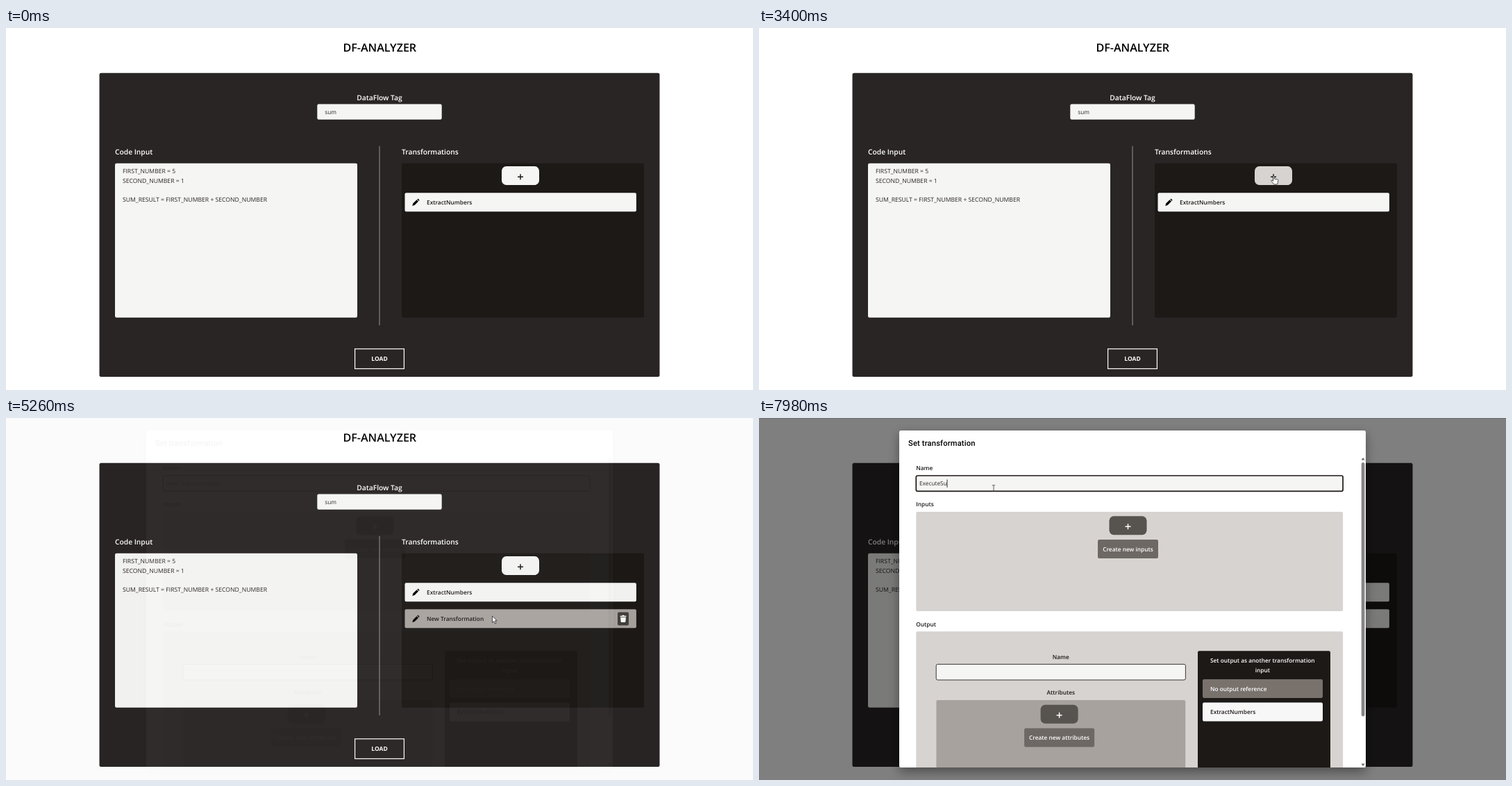
An HTML page that plays this animation: 1076x521 px, repeating every 8 s.

```html
<!DOCTYPE html>
<html lang="en">
<head>
<meta charset="utf-8">
<title>DF-ANALYZER</title>
<style>
  html, body { margin: 0; width: 100%; height: 100%; overflow: hidden; background: #fff; }
  svg { display: block; width: 100%; height: 100%; }
  text { font-family: "Open Sans", "Noto Sans", sans-serif; font-size: 8.3px; text-rendering: geometricPrecision; white-space: pre; }
  .b { font-weight: 600; }
  .mid { text-anchor: middle; }
  .w { fill: #fff; }
  .k { fill: #1c1917; }
  .label { font-size: 10.25px; font-weight: 600; fill: #fff; }
  .code { font-size: 8.65px; fill: #292524; }
  .title { font: 500 11.2px Roboto, sans-serif; letter-spacing: .0125em; }
</style>
</head>
<body>
<svg viewBox="0 0 1076 521" preserveAspectRatio="none">
  <defs>
    <path id="pencil" d="M0 10 .9 6.7 6.3 1.3 8.7 3.7 3.3 9.1ZM7 .6 7.5.1Q8.1-.4 8.7.1L9.9 1.3Q10.4 1.9 9.9 2.5L9.4 3Z"/>
    <g id="bin">
      <rect x="881" y="-9.5" width="16" height="19" rx="2" fill="#44403c"/>
      <path d="M884.5-4.2h2.8l.6-.9h2.2l.6.9h2.8v1.3h-9ZM885.1-2.2h7.8l-.5 6.2q-.1 1-1.1 1h-4.6q-1 0-1.1-1Z" fill="#fff"/>
    </g>
    <path id="plus" d="M-4 0H4M0-4V4" fill="none" stroke-width="1.5"/>
    <clipPath id="dialogClip"><rect x="202" y="18" width="672" height="485" rx="2.5"/></clipPath>
    <filter id="shadow" x="-10%" y="-10%" width="120%" height="125%">
      <feDropShadow dx="0" dy="6" stdDeviation="8" flood-color="#000" flood-opacity=".4"/>
    </filter>
  </defs>

  <g id="page">
    <rect width="1076" height="521" fill="#fff"/>
    <text class="b mid" x="538.3" y="33.8" style="font-size:16.1px">DF-ANALYZER</text>
    <rect x="134.5" y="64.7" width="807" height="437.3" rx="2.5" fill="#292524"/>
    <text class="label mid" x="538" y="103.6">DataFlow Tag</text>
    <rect x="448.3" y="109.5" width="179.4" height="22.3" rx="2.2" fill="#f5f5f4"/>
    <text x="459.3" y="124" fill="#292524">sum</text>
    <path d="M538 170V428" stroke="#a8a29e" stroke-width=".9"/>

    <text class="label" x="157" y="182">Code Input</text>
    <rect x="157" y="194.7" width="349" height="222" rx="2.2" fill="#f5f5f4"/>
    <text class="code" x="168" y="209">FIRST_NUMBER = 5</text>
    <text class="code" x="168" y="222.5">SECOND_NUMBER = 1</text>
    <text class="code" x="168" y="249.5">SUM_RESULT = FIRST_NUMBER + SECOND_NUMBER</text>

    <text class="label" x="570" y="182">Transformations</text>
    <rect x="570" y="194.7" width="349" height="222" rx="2.2" fill="#1c1917"/>
    <rect id="add" x="714" y="199" width="54" height="27" rx="6.7"/>
    <use href="#plus" x="741" y="214.3" stroke="#1c1917"/>
    <g id="rows"></g>

    <rect id="fill" x="502.6" y="461.8" height="28.6" fill="#e7e5e4"/>
    <rect x="502.6" y="461.8" width="70.8" height="28.6" fill="none" stroke="#fff" stroke-width="1.2"/>
    <text id="load" class="b mid" x="538" y="479.4" style="font-size:8.5px;font-weight:700">LOAD</text>
  </g>

  <g id="modal">
    <rect width="1076" height="521" opacity=".5"/>
    <path d="M0 .5H1076" stroke="#6e6e6e"/>
    <rect x="202" y="18" width="672" height="485" rx="2.5" fill="#fff" filter="url(#shadow)"/>
    <g clip-path="url(#dialogClip)">
      <text class="title" x="215" y="39.8">Set transformation</text>
      <text class="b k" x="226.3" y="75.3">Name</text>
      <rect id="field" x="226.3" y="83" width="614.8" height="22.4" rx="2.2" fill="#f5f5f4" stroke="#1c1917"/>
      <rect id="mark" x="231" y="88" height="12.3" fill="#0078d7"/>
      <text id="typed" x="231" y="97.4"></text>
      <path id="caret" d="M0 88.5V100" stroke="#000" stroke-width=".8"/>

      <text class="b k" x="226.3" y="127">Inputs</text>
      <rect x="226.3" y="135" width="614.8" height="143" rx="2" fill="#d6d3d1"/>
      <g id="inputTools"></g>

      <text class="b k" x="226.3" y="299.5">Output</text>
      <rect x="226.3" y="307.3" width="614.8" height="220" rx="2" fill="#d6d3d1"/>
      <text class="b k mid" x="434.8" y="346.5">Name</text>
      <rect x="255.2" y="354.4" width="359.2" height="22.6" rx="2.2" fill="#f5f5f4" stroke="#292524" stroke-width=".9"/>
      <text class="b k mid" x="434.8" y="398">Attributes</text>
      <rect x="255.4" y="406" width="358.8" height="120" rx="2" fill="#a8a29e"/>
      <g id="attrTools"></g>

      <rect x="632" y="335.3" width="191" height="190" rx="2.2" fill="#1c1917"/>
      <text class="b w mid" x="725.3" y="352.2">Set output as another transformation</text>
      <text class="b w mid" x="725.3" y="365.7">input</text>
      <rect x="639" y="376" width="173" height="27" rx="2.2" fill="#78716c"/>
      <text class="b w" x="650" y="392.5">No output reference</text>
      <rect x="639" y="409.5" width="173" height="27" rx="2.2" fill="#f8f7f7"/>
      <text class="b k" x="650" y="426">ExtractNumbers</text>

      <rect x="867.7" y="64" width="4.8" height="365.5" rx="2.4" fill="#858585"/>
      <path d="M867.6 60.5h5l-2.5-3.6ZM867.6 497.5h5l-2.5 3.6Z" fill="#666"/>
    </g>
  </g>

  <g id="cursor">
    <path id="arrow" d="M0 0V9.4L2.2 7.4 3.8 11 5.4 10.3 3.9 6.8H6.7Z" fill="#fff" stroke="#111" stroke-width=".7"/>
    <path id="hand" d="M-.2 0Q.8-1 1.5.3V4.2L6 5Q7 5.4 6.8 6.7L6.2 10 5.4 12H.9L-3 7.4Q-3.3 6 -1.9 6.2L-.4 7.3Z" fill="#fff" stroke="#111" stroke-width=".7"/>
    <path id="beam" d="M-2.2-4.2H-.5L0-3.8.5-4.2H2.2M0-3.8V4M-2.2 4.4H-.5L0 4 .5 4.4H2.2" fill="none" stroke="#333" stroke-width=".8"/>
  </g>
</svg>

<script>
const LOOP = 8000, STEP = 70.25, START = 200;
const el = Object.fromEntries([...document.querySelectorAll("[id]")].map(n => [n.id, n]));
const set = (node, attrs) => { for (const k in attrs) node.setAttribute(k, attrs[k]); };
const show = (node, on) => set(node, { visibility: on ? "visible" : "hidden" });
const clamp = v => Math.max(0, Math.min(1, v));
const ease = v => v * v * (3 - 2 * v);
const mix = (a, b, p) => `rgb(${a.map((v, i) => Math.round(v + (b[i] - v) * p))})`;

const PALE = [245, 245, 244], GREY = [168, 162, 158], SOFT = [214, 211, 209], DARK = [28, 25, 23], WHITE = [255, 255, 255];

// Pointer path: time, x, y
const PATH = [
  [200, 1031, 512], [450, 830, 400], [700, 700, 330], [960, 648, 309],
  [1250, 618, 299], [1500, 600, 318], [1780, 606, 344], [2100, 545, 455],
  [2180, 537, 478], [2330, 546, 489], [2450, 590, 466], [2600, 707, 375],
  [2670, 736, 349], [2800, 745, 290], [3000, 742, 245], [3150, 741, 213],
  [3500, 741, 213], [3640, 748, 222], [3760, 758, 260], [3860, 766.5, 282.5],
  [4350, 766.5, 282.5], [4735, 714, 277], [4766, 708, 262], [4900, 703, 250],
  [5000, 702, 256], [5120, 700.5, 285], [5560, 700.5, 285], [5900, 560, 215],
  [6200, 380, 115], [6370, 338, 101]
];

// Hover spans: from, to
const HOVER = {
  load: [[2110, 2400]],
  add: [[3130, 3660]],
  first: [[2960, 3110], [3680, 3790], [4790, 5030]],
  second: [[3790, 4745], [5050, 5290]]
};
const ADDED = 3430, OPENED = 5190, FOCUSED = 6290, SELECTED = 6440;

const OLD_NAME = "New Transformation", NEW_NAME = "ExecuteSu";
const KEYS = [6840, 7040, 7180, 7370, 7430, 7500, 7710, 7910, 7980];
const FADE = [0, .03, .5, .94, 1];

function row(y, name) {
  el.rows.insertAdjacentHTML("beforeend", `<g>
    <rect x="574.5" y="${y}" width="333.4" height="27" rx="2"/>
    <use href="#pencil" x="585.3" y="${y + 8.7}"/>
    <text class="b k" x="606" y="${y + 16.8}">${name}</text>
    <use href="#bin" y="${y + 13.6}"/></g>`);
  const g = el.rows.lastElementChild;
  return { g, box: g.firstElementChild, bin: g.lastElementChild };
}

function tools(parent, cx, y, label, width) {
  parent.innerHTML = `<rect x="${cx - 27}" y="${y}" width="54" height="27" rx="6.7" fill="#57534e"/>
    <use href="#plus" x="${cx}" y="${y + 15}" stroke="#fff"/>
    <rect x="${cx - width / 2}" y="${y + 33.7}" width="${width}" height="27" rx="2.2" fill="#6e6864"/>
    <text class="b w mid" x="${cx}" y="${y + 50.3}">${label}</text>`;
}

const first = row(237.2, "ExtractNumbers");
const second = row(275.3, OLD_NAME);
tools(el.inputTools, 531.5, 141.2, "Create new inputs", 87);
tools(el.attrTools, 432.6, 412.8, "Create new attributes", 101);

const inside = (t, spans) => spans.some(([a, b]) => t >= a && t < b);

function glow(t, spans, time) {
  return Math.max(...spans.map(([a, b]) =>
    Math.min(ease(clamp((t - a) / time)), 1 - ease(clamp((t - b) / time)))));
}

function pointer(t) {
  const i = PATH.findIndex(p => p[0] > t);
  if (i < 0) return PATH[PATH.length - 1].slice(1);
  const a = PATH[Math.max(0, i - 1)], b = PATH[i];
  const p = clamp((t - a[0]) / (b[0] - a[0] || 1));
  return [a[1] + (b[1] - a[1]) * p, a[2] + (b[2] - a[2]) * p];
}

function drawRow({ box, bin }, p) {
  set(box, { fill: mix(PALE, GREY, p) });
  set(bin, { opacity: p });
}

function drawPage(t) {
  drawRow(first, glow(t, HOVER.first, 120));
  drawRow(second, glow(t, HOVER.second, 100));
  show(second.g, t >= ADDED);
  set(el.add, { fill: mix(PALE, SOFT, glow(t, HOVER.add, 120)) });
  const p = glow(t, HOVER.load, 300);
  set(el.fill, { width: 70.8 * p });
  set(el.load, { fill: mix(WHITE, DARK, p) });
}

function drawModal(t, step) {
  const shade = t < OPENED ? 0 : FADE[Math.min(FADE.length - 1, step - 71)];
  set(el.modal, { opacity: shade });
  show(el.modal, shade > 0);
}

function drawField(t) {
  const count = KEYS.filter(k => t >= k).length;
  const marked = t >= SELECTED && !count;
  const text = count ? NEW_NAME.slice(0, count) : OLD_NAME;
  if (el.typed.textContent !== text) el.typed.textContent = text;
  const width = el.typed.getComputedTextLength();
  set(el.field, { "stroke-width": t >= FOCUSED ? 1.7 : 1 });
  set(el.typed, { fill: marked ? "#fff" : "#292524" });
  set(el.mark, { width, opacity: marked ? 1 : 0 });
  set(el.caret, { transform: `translate(${231.3 + width} 0)`, opacity: t >= FOCUSED && !marked ? 1 : 0 });
}

function drawCursor(t) {
  const [x, y] = pointer(t);
  const beam = t > OPENED && y < 106;
  const hand = t < OPENED && Object.values(HOVER).some(spans => inside(t, spans));
  set(el.cursor, { transform: `translate(${x} ${y})`, display: t < START ? "none" : "inline" });
  show(el.beam, beam);
  show(el.hand, hand);
  show(el.arrow, !beam && !hand);
}

function draw(t) {
  // The screen refreshes in even steps
  const step = Math.floor((t - START) / STEP);
  const held = t < START ? 0 : START + step * STEP;
  drawPage(held);
  drawModal(held, step);
  drawField(t);
  drawCursor(held);
}

const begin = performance.now();
function tick() {
  draw((performance.now() - begin) % LOOP);
  requestAnimationFrame(tick);
}
tick();
</script>
</body>
</html>
```
